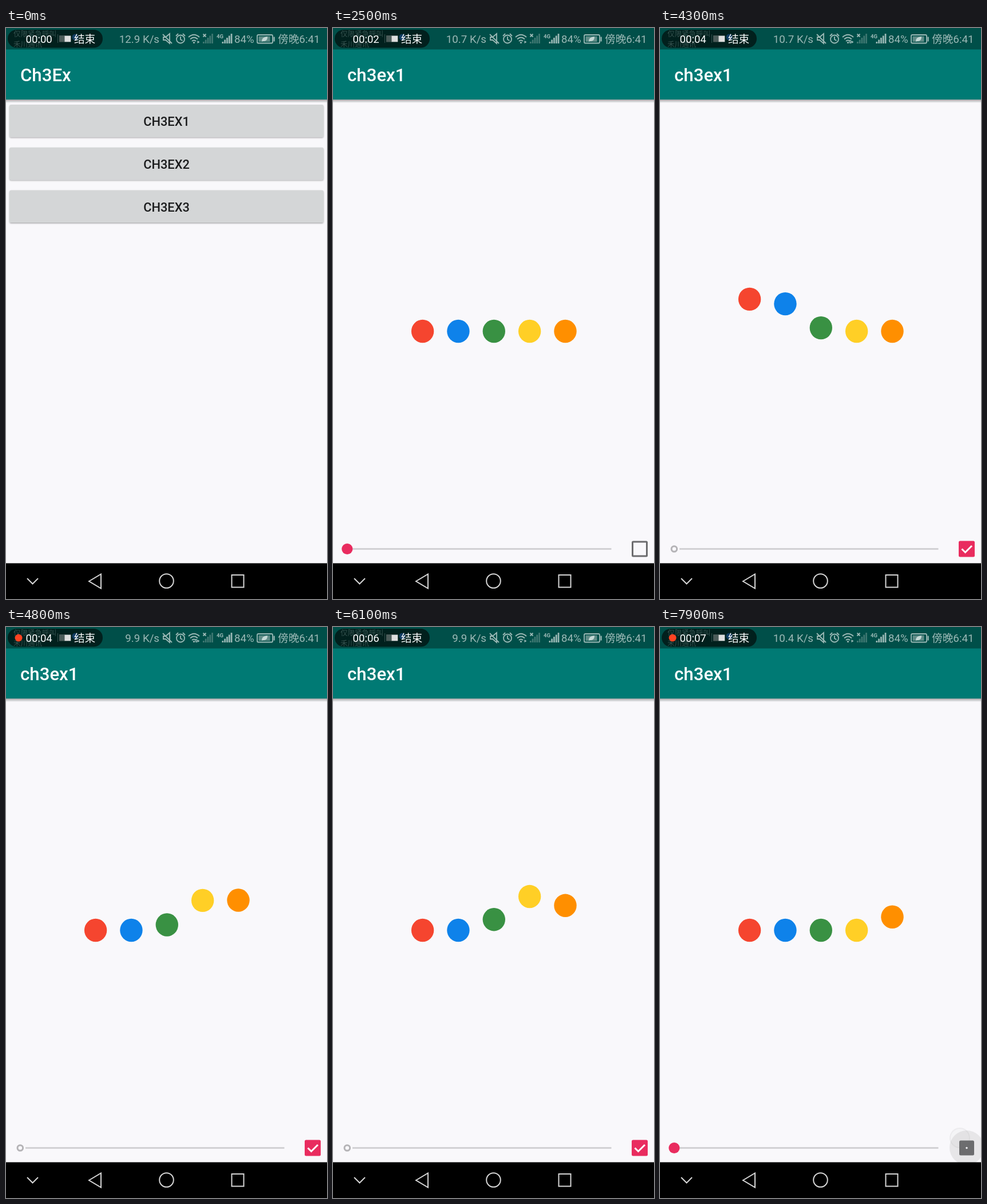
Recreate the animation shown at these times as an HTML page. Size 561 by 998 pixels, loop 8 s.

```html
<!DOCTYPE html>
<html lang="zh-CN">
<head>
<meta charset="utf-8">
<title>Ch3Ex</title>
<style>
html, body { margin: 0; width: 100%; height: 100%; overflow: hidden; background: #000; }
svg { display: block; width: 561px; height: 998px; }
text { font-family: Roboto, 'Noto Sans CJK SC', 'Noto Sans CJK', sans-serif; white-space: pre; }
.title { font-size: 31.2px; font-weight: 500; fill: #fff; }
.label { font-size: 21.8px; font-weight: 500; fill: #1b1c1d; text-anchor: middle; }
.status text { font-size: 18.7px; fill: #9cb9b6; }
.line { fill: none; stroke: #9cb9b6; stroke-width: 1.8; }
.nav { fill: none; stroke: #d6d6d6; stroke-width: 2; }
.carrier { font-size: 12.5px; fill: #35514e; }
.rec { font-size: 18.6px; fill: #fff; }
</style>
</head>
<body>
<svg viewBox="0 0 561 998">
  <defs>
    <linearGradient id="shade" x2="0" y2="1">
      <stop stop-color="#000" stop-opacity=".34"/>
      <stop offset="1" stop-color="#000" stop-opacity="0"/>
    </linearGradient>
    <filter id="lift" x="-5%" y="-20%" width="110%" height="150%">
      <feDropShadow dx="0" dy="1.5" stdDeviation="1.3" flood-opacity=".32"/>
    </filter>
    <clipPath id="press"><rect x="6" y="134" width="549" height="56.5" rx="3"/></clipPath>
  </defs>

  <g id="menu"></g>
  <g id="demo"></g>
  <circle id="touch" r="17" fill="#888" fill-opacity=".12" stroke="#777" stroke-opacity=".25" stroke-width="2"/>

  <g class="status">
    <text id="speed" x="268" y="26" text-anchor="end"></text>
    <path class="line" d="M275 16h4l7-6v17l-7-6h-4zM274 11l16 16"/>
    <circle class="line" cx="305" cy="19.5" r="7"/>
    <path class="line" d="M305 15v5l3.5 2M297 14l4-4M313 14l-4-4"/>
    <path class="line" stroke-width="2" d="M319 16q9.500-8.500 19 0M322 19.500q6.500-6 13 0M325 23q3.500-3 7 0"/>
    <circle cx="328.500" cy="25.500" r="1.600" fill="#9cb9b6"/>
    <path id="arrowIn" d="M330 23.500l2.500-3 2.500 3zM330 24.500l2.500 3 2.500-3z" fill="#9cb9b6"/>
    <path d="M334.500 22l4 2.500-4 2.500z" fill="#9cb9b6"/>
    <path class="line" stroke-width="1.500" d="M344.500 10.500l5 5M349.500 10.500l-5 5"/>
    <g id="bars"></g>
    <text x="368" y="18" style="font-size:9.500px;font-weight:700">4G</text>
    <text x="399" y="26">84%</text>
    <rect class="line" x="439" y="12" width="27" height="14.500" rx="2" stroke-width="1.500"/>
    <rect x="441.500" y="14.500" width="20" height="9.500" fill="#5f8c87"/>
    <path d="M447 24q-1-8 10-9q0 9-8 8z" fill="#c3d8d5"/>
    <rect x="467.500" y="15.500" width="2.200" height="8" fill="#9cb9b6"/>
    <text x="475" y="26">傍晚6:41</text>
  </g>

  <rect x="3" y="3" width="166" height="31.500" rx="15.700" fill="#01201d"/>
  <text class="carrier" x="13" y="15">仅限紧急呼叫</text>
  <text class="carrier" x="13" y="33">禾川通讯</text>
  <circle cx="121" cy="16" r="5.500" fill="#123d63"/>
  <path d="M90.500 11v15" stroke="#35514e"/>
  <rect x="93" y="13" width="10" height="11.500" fill="#4b5b59"/>
  <rect x="102.500" y="13.500" width="10.800" height="10.800" fill="#dedede"/>
  <circle id="blink" cx="22" cy="19" r="6.500" fill="#ff4322"/>
  <text id="timer" class="rec" x="34.500" y="26"></text>
  <text class="rec" x="119" y="26">结束</text>

  <rect y="935.500" width="561" height="63" fill="#000"/>
  <path class="nav" d="M37 962l9.500 9.500 9.500-9.500M145 967l21-12.500v25zM394.500 956h21v21.500h-21z"/>
  <circle class="nav" cx="280.500" cy="966.500" r="12.300"/>
</svg>

<script>
const $ = id => document.getElementById(id);
const set = (id, attrs) => { for (const k in attrs) $(id).setAttribute(k, attrs[k]); };
const clamp = x => Math.max(0, Math.min(1, x));
const ramp = (t, from, length) => clamp((t - from) / length);
const smooth = x => x * x * (3 - 2 * x);

const page = title => `
  <rect width="561" height="936" fill="#f9f8fb"/>
  <rect y="125" width="561" height="6" fill="url(#shade)"/>
  <rect width="561" height="38" fill="#004f49"/>
  <rect y="37.500" width="561" height="87.500" fill="#007a74"/>
  <text class="title" x="25" y="93">${title}</text>`;

const button = n => {
  const y = 134 + 74.8 * (n - 1);
  return `<rect x="6" y="${y}" width="549" height="56.500" rx="3" fill="#d4d6d7" filter="url(#lift)"/>
    <text class="label" x="280.500" y="${y + 37}">CH3EX${n}</text>`;
};

const colors = ['#f5452f', '#0e82ea', '#399143', '#ffcf26', '#ff8f00'];
$('menu').innerHTML = page('Ch3Ex') + [1, 2, 3].map(button).join('') +
  '<circle id="buttonRipple" cx="281" cy="163" clip-path="url(#press)"/>';
$('demo').innerHTML = page('ch3ex1') +
  colors.map((c, i) => `<ellipse id="ball${i}" cx="${156.6 + 62.35 * i}" rx="19.700" ry="20.200" fill="${c}"/>`).join('') + `
  <path d="M34 910.500H486.500" stroke="#d2d1d4" stroke-width="3"/>
  <circle id="thumb" cx="24.800" cy="910.500"/>
  <circle id="boxRipple" cx="536" cy="910"/>
  <rect id="box" x="522" y="896.500" width="28" height="28" rx="2.500"/>
  <rect id="hole" fill="#f9f8fb"/>
  <path id="tick" d="M527.500 910.500l6 6 11.500-11.500" fill="none" stroke="#fff" stroke-width="3" pathLength="1"/>`;

let bars = '';
for (let i = 0; i < 5; i++) {
  const h = 3 + 3.5 * i;
  for (const [x, fill] of [[344, '#3f7872'], [377.500, '#9cb9b6']])
    bars += `<rect x="${x + 3.8 * i}" y="${27 - h}" width="2.700" height="${h}" fill="${fill}"/>`;
}
$('bars').innerHTML = bars;

const LOOP = 8000, TAP = 1500, SLIDE = 1950, CHECK = 3700, UNCHECK = 7686;
const RISE = 320, HEIGHT = 62, waves = [3919, 5257, 6539];

// Each ball rises and falls, half a rise after its left neighbour.
function drawBalls(t) {
  const now = Math.min(t, UNCHECK);
  const start = waves.filter(w => w <= now).pop() ?? Infinity;
  colors.forEach((_, i) => {
    const u = (now - start) / RISE - i / 2;
    set('ball' + i, { cy: 530 - HEIGHT * smooth(clamp(1 - Math.abs(u - 1))) });
  });
}

function drawRipple(id, t, down, up, radius) {
  set(id, {
    r: radius * Math.sqrt(ramp(t, down, 220)),
    'fill-opacity': t < down ? 0 : .075 * (1 - ramp(t, up + 200, 300))
  });
}

function drawBox(t) {
  const on = t >= CHECK && t < UNCHECK;
  const filled = t < UNCHECK ? ramp(t, CHECK, 150) : 1 - ramp(t, UNCHECK + 220, 150);
  const drawn = t < UNCHECK ? ramp(t, CHECK + 150, 200) : 1 - ramp(t, UNCHECK, 200);
  const dot = t >= UNCHECK + 200 && filled === 1;
  const side = dot ? 3 : 22 * (1 - filled);
  const inset = t >= UNCHECK ? 1 - Math.abs(ramp(t, UNCHECK, 428) * 2 - 1) : 0;
  set('box', {
    x: 522 + inset, y: 896.5 + inset, width: 28 - 2 * inset, height: 28 - 2 * inset,
    fill: on && filled === 1 ? '#e92c5f' : '#6c6c6e'
  });
  set('hole', {
    x: 536 - side / 2, y: 910.5 - side / 2, width: side, height: side,
    transform: dot ? 'rotate(45 536 910.500)' : ''
  });
  set('tick', { 'stroke-dasharray': `${drawn} 2`, opacity: drawn > 0 ? 1 : 0 });
  set('thumb', on
    ? { r: 4.8, fill: '#f9f8fb', stroke: '#b4b3b6', 'stroke-width': 3 }
    : { r: 9.6, fill: '#e92c5f', stroke: 'none' });
}

const touches = [[TAP, 1700, 281, 163], [3500, CHECK, 530, 905], [7590, 7800, 524, 893]];
function drawTouch(t) {
  const hit = touches.find(([down, up]) => t >= down && t < up + 200);
  if (hit) set('touch', { cx: hit[2], cy: hit[3], opacity: 1 - ramp(t, hit[1], 150) });
  else set('touch', { opacity: 0 });
}

function draw(t) {
  const slide = 1 - (1 - ramp(t, SLIDE, 450)) ** 3;
  set('menu', { transform: `translate(${-140 * slide})` });
  set('demo', { transform: `translate(${561 * (1 - slide)})` });
  drawRipple('buttonRipple', t, TAP, 1700, 280);
  if (t < 7000) drawRipple('boxRipple', t, 3500, CHECK, 30);
  else drawRipple('boxRipple', t, 7590, 7750, 30);
  drawBalls(t);
  drawBox(t);
  drawTouch(t);
  $('speed').textContent = ['12.9', '10.7', '9.9', '10.4'][Math.floor((t + 1600) / 3000)] + ' K/s';
  $('timer').textContent = '00:0' + Math.floor(t / 1000);
  set('blink', { opacity: t % 1000 > 550 ? 1 : 0 });
  set('arrowIn', { opacity: t >= 2800 && t < 5800 ? 1 : 0 });
}

function tick() {
  draw(Math.floor(performance.now() % LOOP / 100) * 100);
  requestAnimationFrame(tick);
}
tick();
</script>
</body>
</html>
```
